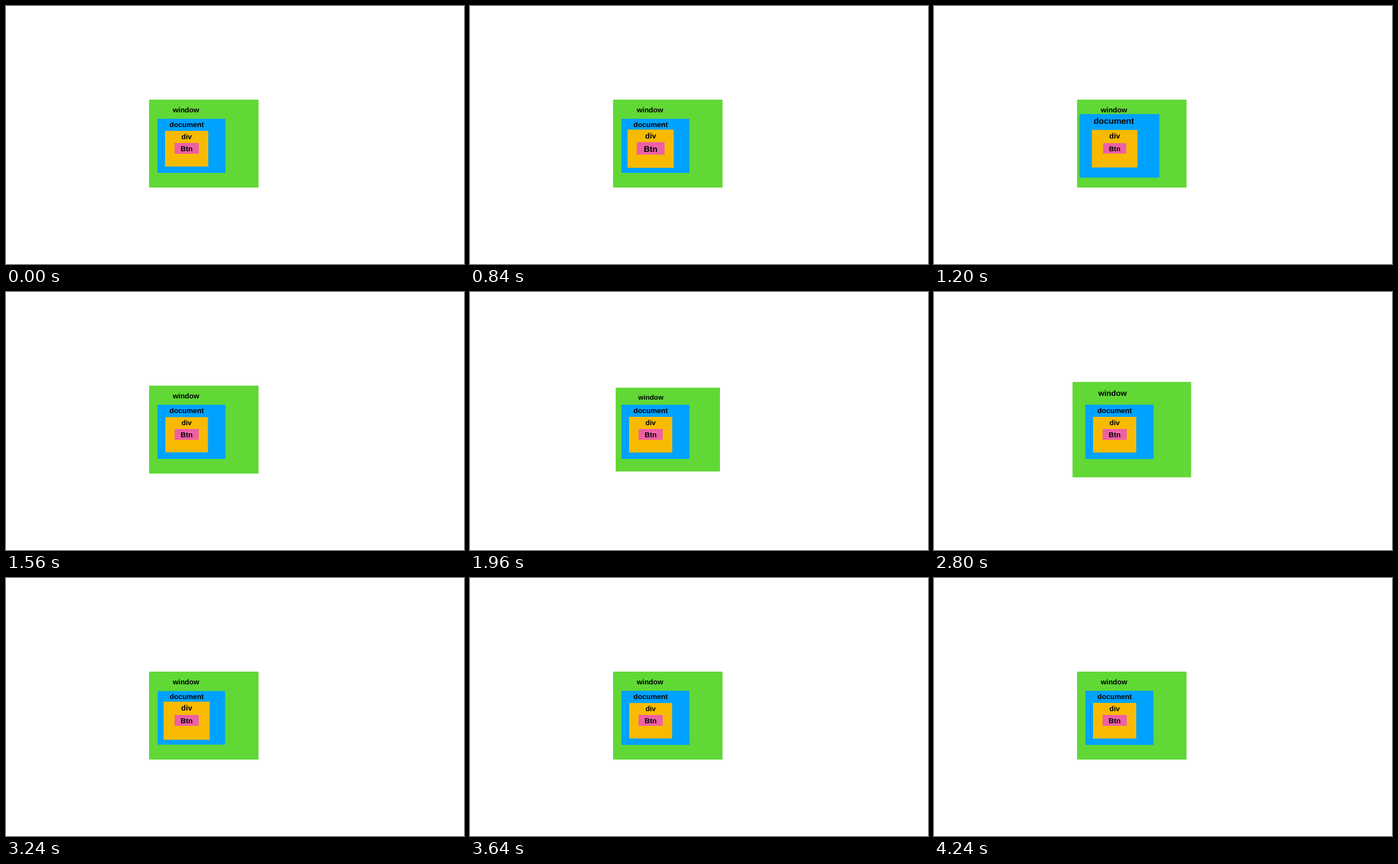
An HTML page that plays this animation: 720x405 px, repeating every 4720 ms.

```html
<!DOCTYPE html>
<html lang="en">
<head>
<meta charset="utf-8">
<title>Event path</title>
<style>
  html, body { margin: 0; width: 100%; height: 100%; overflow: hidden; background: #fff; }
  svg { display: block; width: 720px; height: 405px; }
  text {
    font: bold 11.3px "Liberation Sans", Arial, sans-serif;
    text-anchor: middle;
    fill: #000;
    text-rendering: geometricPrecision;
  }
</style>
</head>
<body>
<svg id="stage" viewBox="0 0 720 405"></svg>
<script>
const LOOP = 4720, STEP = 40;

// pulses: [start, duration] in ms, first on the way out, then on the way back
const boxes = [
  { label: 'window',   x: 225, y: 147, w: 172, h: 138, fill: '#61d836', tx: 283, ty: 167, pulses: [[1610, 510], [2568, 500]] },
  { label: 'document', x: 238, y: 177, w: 107, h: 85,  fill: '#00a2ff', tx: 284, ty: 190, pulses: [[1040, 500], [2788, 500]] },
  { label: 'div',      x: 250, y: 196, w: 68,  h: 56,  fill: '#f8ba00', tx: 284, ty: 209, pulses: [[726, 947], [3182, 498]] },
  { label: 'Btn',      x: 265, y: 215, w: 38,  h: 17,  fill: '#ee5fa7', tx: 284, ty: 228, pulses: [[500, 900], [3765, 475]] }
];

// swell, dip below full size, settle
const keys = [[0, 1], [0.28, 1.18], [0.69, 0.953], [1, 1]];

function pulse(p) {
  if (p <= 0 || p >= 1) return 1;
  const i = keys.findIndex(k => k[0] > p);
  const [p0, s0] = keys[i - 1], [p1, s1] = keys[i];
  const ease = (1 - Math.cos(Math.PI * (p - p0) / (p1 - p0))) / 2;
  return s0 + (s1 - s0) * ease;
}

function add(parent, tag, attrs) {
  const el = document.createElementNS('http://www.w3.org/2000/svg', tag);
  for (const name in attrs) el.setAttribute(name, attrs[name]);
  return parent.appendChild(el);
}

const stage = document.getElementById('stage');
for (const b of boxes) {
  b.el = add(stage, 'g', {});
  add(b.el, 'rect', { x: b.x, y: b.y, width: b.w, height: b.h, fill: b.fill });
  add(b.el, 'text', { x: b.tx, y: b.ty }).textContent = b.label;
}

const begin = performance.now();

function draw() {
  const now = (performance.now() - begin) % LOOP;
  const t = Math.floor(now / STEP) * STEP;
  for (const { el, x, y, w, h, pulses } of boxes) {
    const s = pulses.reduce((acc, [start, len]) => acc * pulse((t - start) / len), 1);
    const cx = x + w / 2, cy = y + h / 2;
    el.setAttribute('transform', `translate(${cx} ${cy}) scale(${s}) translate(${-cx} ${-cy})`);
  }
  requestAnimationFrame(draw);
}
draw();
</script>
</body>
</html>
```
